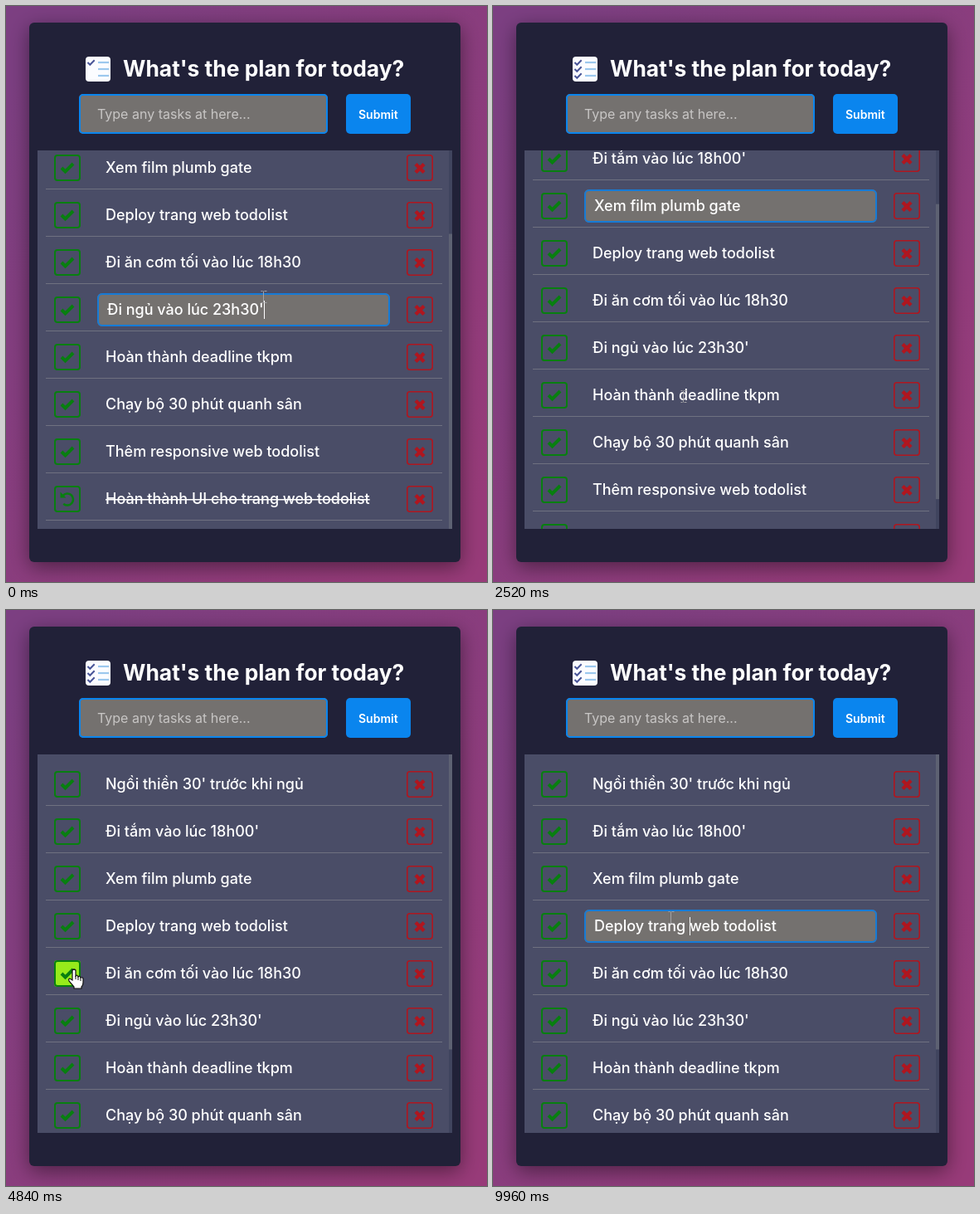
An HTML page with a canvas for the animation above (10 s loop, 580x694 px).

```html
<!DOCTYPE html>
<html lang="vi">
<head>
<meta charset="utf-8">
<title>Todo list</title>
<style>
  html, body { margin: 0; width: 100%; height: 100%; overflow: hidden; background: #833f80; }
  canvas { display: block; }
</style>
</head>
<body>
<canvas id="stage" width="580" height="694"></canvas>
<script>
const ctx = document.getElementById('stage').getContext('2d');
const LOOP = 10000;
const FONT = 'Inter, "Open Sans", sans-serif';
const GREEN = '#087f10', RED = '#b0161f', BLUE = '#0a85ee', FIELD = '#74716f';

const LIST = { x: 38, y: 174, w: 500, h: 456, row: 57, content: 585 };
const TASKS = [
  "Ngồi thiền 30' trước khi ngủ",
  "Đi tắm vào lúc 18h00'",
  'Xem film plumb gate',
  'Deploy trang web todolist',
  'Đi ăn cơm tối vào lúc 18h30',
  "Đi ngủ vào lúc 23h30'",
  'Hoàn thành deadline tkpm',
  'Chạy bộ 30 phút quanh sân',
  'Thêm responsive web todolist',
  'Hoàn thành UI cho trang web todolist'
];

// Timeline
const SCROLL = [[1120, 129], [1620, 0], [1960, 0], [2120, 35], [2320, 129], [2400, 129], [2520, 83], [2760, 0]];
const MOUSE = [
  [60, 310, 350], [540, 268, 198], [1000, 268, 198], [1500, 229, 438], [2120, 229, 438],
  [2520, 229, 470], [2960, 341, 438], [3300, 300, 440], [3500, 300, 440], [3850, 250, 494],
  [4200, 180, 470], [4600, 85, 437], [4840, 82, 433], [5200, 79, 438], [7720, 77, 439],
  [8700, 77, 439], [9200, 150, 410], [9700, 214, 370]
];
const EDITS = [
  { from: -100, to: 560, task: 5, caret: 21 },
  { from: 580, to: 3360, task: 2, caret: 16 },
  { from: 3360, to: 4440, task: 4, caret: 20 },
  { from: 9800, to: LOOP, task: 3, caret: 13 }
];
const TOGGLES = [5200, 5740, 6400, 7000, 7560, 8240];
const HOVER = [4560, 8800];
const DRAWS = [-100, 1060, 2180, 3650, 4540, 5760, 6960, 8200, 9400, 10900];

const clamp = v => Math.max(0, Math.min(1, v));
const ease = u => u * u * (3 - 2 * u);

function track(keys, t, field = 1) {
  if (t <= keys[0][0]) return keys[0][field];
  for (let i = 1; i < keys.length; i++) {
    const a = keys[i - 1], b = keys[i];
    if (t <= b[0]) return a[field] + (b[field] - a[field]) * ease((t - a[0]) / (b[0] - a[0]));
  }
  return keys[keys.length - 1][field];
}

function box(x, y, w, h, r, fill, stroke, line = 2) {
  ctx.beginPath();
  ctx.roundRect(x, y, w, h, r);
  if (fill) { ctx.fillStyle = fill; ctx.fill(); }
  if (stroke) {
    ctx.beginPath();
    ctx.roundRect(x + line / 2, y + line / 2, w - line, h - line, Math.max(0, r - line / 2));
    ctx.strokeStyle = stroke;
    ctx.lineWidth = line;
    ctx.stroke();
  }
}

function text(str, x, y, size, weight = 400, color = '#fff') {
  ctx.font = `${weight} ${size}px ${FONT}`;
  ctx.fillStyle = color;
  ctx.fillText(str, x, y);
}

function lines(points, color, width) {
  ctx.beginPath();
  points.forEach(([x, y], i) => i ? ctx.lineTo(x, y) : ctx.moveTo(x, y));
  ctx.strokeStyle = color;
  ctx.lineWidth = width;
  ctx.stroke();
}

function polygon(points, fill) {
  ctx.beginPath();
  points.forEach(([x, y]) => ctx.lineTo(x, y));
  ctx.closePath();
  ctx.fillStyle = fill;
  ctx.fill();
}

// A tick of which only the part between two fractions is shown.
function partialTick(x, y, from, to) {
  if (to <= from) return;
  const at = u => u < 0.35
    ? [x + 2.8 * u / 0.35, y + 2.8 * u / 0.35]
    : [x + 2.8 + 5.4 * (u - 0.35) / 0.65, y + 2.8 - 5.6 * (u - 0.35) / 0.65];
  const points = [at(from)];
  if (from < 0.35 && to > 0.35) points.push(at(0.35));
  points.push(at(to));
  lines(points, '#4a5698', 2);
}

function drawLogo(t) {
  box(96, 61, 30, 30, 4, '#fbfcff');
  let i = 0;
  while (DRAWS[i + 1] <= t) i++;
  const start = DRAWS[i];
  const erase = Math.max(DRAWS[i + 1] - 680, start + 340);
  const shown = clamp((t - start) / 300) * 3;
  const gone = clamp((t - erase) / 440) * 3;
  for (let k = 0; k < 3; k++) {
    const y = 68 + 8 * k;
    lines([[111, y], [124, y]], '#9cc8ee', 2.2);
    partialTick(98.5, y, clamp(gone - k), clamp(shown - k));
  }
}

function drawPage() {
  const bg = ctx.createLinearGradient(0, 100, 580, 594);
  bg.addColorStop(0, '#7c3f82');
  bg.addColorStop(1, '#983b79');
  ctx.fillStyle = bg;
  ctx.fillRect(0, 0, 580, 694);
  ctx.save();
  ctx.shadowColor = 'rgba(0,0,0,.45)';
  ctx.shadowBlur = 25;
  ctx.shadowOffsetY = 6;
  box(28, 20, 520, 650, 6, '#212138');
  ctx.restore();

  text("What's the plan for today?", 141, 85, 26.4, 700);
  box(88, 106, 300, 48, 5, FIELD, BLUE);
  text('Type any tasks at here...', 110, 136, 16, 400, '#c8c6c5');
  box(410, 106, 78, 48, 5, BLUE);
  text('Submit', 425, 135.5, 14, 600);
}

function undoIcon(y) {
  ctx.beginPath();
  ctx.arc(74, y + 0.5, 7, -2.45, 2.3);
  ctx.strokeStyle = GREEN;
  ctx.lineWidth = 2.6;
  ctx.stroke();
  polygon([[65.5, y - 8.5], [65.5, y - 1.5], [72.5, y - 1.5]], GREEN);
}

function drawRow(i, y, t, edit) {
  const done = i === 9 || (i === 4 && TOGGLES.filter(at => at <= t).length % 2 === 1);
  const hover = i === 4 && t >= HOVER[0] && t < HOVER[1];

  box(58, y - 16, 32, 32, 4, hover ? '#97eb1b' : null, GREEN);
  if (done) undoIcon(y);
  else lines([[67, y], [71.5, y + 4.5], [81, y - 5]], GREEN, 4);

  box(483, y - 16, 32, 32, 4, null, RED, 1.6);
  lines([[494, y - 4.5], [504, y + 5.5]], RED, 4.2);
  lines([[504, y - 4.5], [494, y + 5.5]], RED, 4.2);

  ctx.fillStyle = '#6f7180';
  ctx.fillRect(48, y + 25, 478, 1);

  const editing = edit && edit.task === i;
  if (editing) box(110, y - 20, 353, 40, 6, FIELD, '#167bd6');
  const x = editing ? 122 : 120;
  text(TASKS[i], x, y + 6, 18, 500);
  if (done) {
    ctx.fillRect(x, y, ctx.measureText(TASKS[i]).width, 1.5);
  }
  if (editing && (t - edit.from) % 1000 < 500) {
    const w = ctx.measureText(TASKS[i].slice(0, edit.caret)).width;
    ctx.fillRect(Math.round(x + w), y - 11, 1, 22);
  }
}

function drawList(t) {
  const { x, y, w, h, row, content } = LIST;
  const scroll = Math.round(track(SCROLL, t));
  const edit = EDITS.find(e => t >= e.from && t < e.to);
  ctx.save();
  ctx.beginPath();
  ctx.rect(x, y, w, h);
  ctx.clip();
  ctx.fillStyle = '#4a4d67';
  ctx.fillRect(x, y, w, h);
  TASKS.forEach((_, i) => drawRow(i, y + 36 + row * i - scroll, t, edit));
  ctx.fillStyle = '#40445e';
  ctx.fillRect(x + w - 4, y, 4, h);
  ctx.fillStyle = '#5d6172';
  ctx.fillRect(x + w - 4, y + scroll * h / content, 4, h * h / content);
  ctx.restore();
}

function drawHand(x, y) {
  ctx.save();
  ctx.translate(x, y);
  const shape = new Path2D('M-2 1Q0-1 2 1V8Q4 6 5 9Q7 7 8 10Q11 9 11 12V16Q11 19 9 21V23H0V21L-6 14Q-7 11-5 11L-2 13Z');
  ctx.fillStyle = '#fff';
  ctx.strokeStyle = '#111';
  ctx.lineWidth = 1.2;
  ctx.fill(shape);
  ctx.stroke(shape);
  lines([[2, 8], [2, 12]], '#111', 1);
  lines([[5, 9], [5, 13]], '#111', 1);
  lines([[8, 10], [8, 14]], '#111', 1);
  ctx.restore();
}

function drawBeam(x, y) {
  const px = Math.round(x) + 0.5, py = Math.round(y) + 0.5;
  const gray = '#a3a3a6';
  lines([[px, py - 7], [px, py + 7]], gray, 1);
  for (const dy of [-7, 7]) {
    lines([[px - 3, py + dy], [px - 1, py + dy]], gray, 1);
    lines([[px + 1, py + dy], [px + 4, py + dy]], gray, 1);
  }
}

function frame(now) {
  const t = now % LOOP;
  drawPage();
  drawLogo(t);
  drawList(t);
  const x = track(MOUSE, t), y = track(MOUSE, t, 2);
  (t >= HOVER[0] && t < HOVER[1] ? drawHand : drawBeam)(x, y);
}

const origin = performance.now();
function tick() {
  frame(performance.now() - origin);
  requestAnimationFrame(tick);
}
tick();
</script>
</body>
</html>
```
